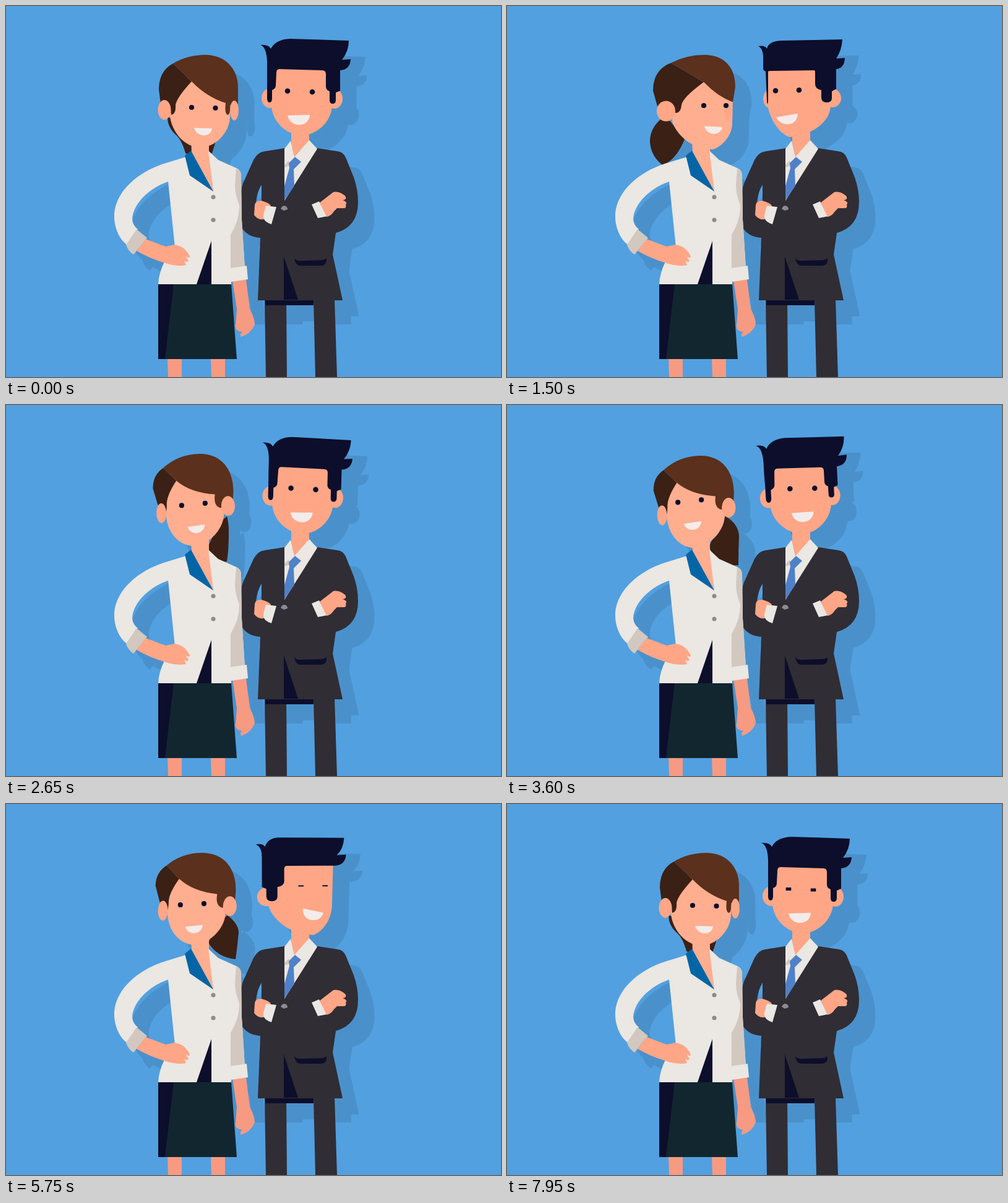
An HTML page that plays this animation: 800 by 600 pixels, repeating every 8 s.

```html
<!DOCTYPE html>
<html lang="en">
<head>
<meta charset="utf-8">
<title>Colleagues</title>
<style>
html, body { margin: 0; width: 100%; height: 100%; overflow: hidden; background: #52a0e0; }
svg { display: block; width: 800px; height: 600px; }
.suit { fill: var(--s, #302d35); }
.navy { fill: var(--s, #0c0e2b); }
.shirt { fill: var(--s, #ebe7e2); }
.fold { fill: var(--s, #d2c8c0); }
.tie { fill: var(--s, #4f81c9); }
.skin { fill: var(--s, #ffa686); }
.fair { fill: var(--s, #ffae8f); }
.limb { fill: var(--s, #f79a82); }
.collar { fill: var(--s, #0465a6); }
.skirt { fill: var(--s, #122630); }
.button { fill: var(--s, #8d8b92); }
.brown { fill: var(--s, #5b301c); }
.dark { fill: var(--s, #3b2015); }
.teeth { fill: var(--s, #f3ecea); }
</style>
</head>
<body>
<svg viewBox="0 0 800 600">
  <defs><clipPath id="wall"><path d="M0,0H800V515H0Z"/></clipPath></defs>
  <rect width="800" height="600" fill="#52a0e0"/>
  <g clip-path="url(#wall)"><use href="#pair" x="26.5" y="26" style="--s:#4a91cb"/></g>
  <g id="pair">
    <path class="suit" d="M418,474H453L454,600H420ZM497,474H531L535,600H500Z"/>
    <path class="navy" d="M419,470H497V484H419Z"/>
    <path class="suit" fill-rule="evenodd" d="M450,230L418,235Q407,236 400,249L383,287Q379,297 379,315L381,358Q389,373 411,375L407,476H544L528,402L533,367Q569,357 569,317Q569,297 562,277L549,245Q545,236 536,235L503,230ZM413,289Q406,300 404,317L413,315Z"/>
    <path class="skin" d="M461,195H490V219L466,246L461,222Z"/>
    <path class="shirt" d="M460,218L450,231V315L503,231L490,217L466,244Z"/>
    <path class="fold" d="M450,261V257L457,250L459,258Z"/>
    <path class="tie" d="M467,244L477,252L465,264L466,291L450,314V291L458,262L457,254Z"/>
    <path class="navy" d="M449,405L472,475H449ZM466,407Q468,412 475,412L510,411Q517,410 518,407V412Q517,420 508,420H475Q467,419 466,407Z"/>
    <path class="skin" d="M402,322Q403,314 413,315Q425,318 428,323L420,344Q408,348 401,338Z"/>
    <path class="shirt" d="M420,323L437,325L429,353Q414,348 416,338ZM494,321L506,316L519,340L504,343Z"/>
    <path class="button" d="M444,328Q446,323 450,323Q455,324 455,329L449,331Z"/>
    <path class="skin" d="M507,318L529,301Q538,299 548,307Q552,313 544,314Q553,317 549,321Q551,327 545,327H535L530,332Q525,340 518,341Z"/>
    <g id="man"></g>

    <path id="pony" class="dark"/>
    <path class="limb" d="M261,570H284V600H262ZM331,570H354V600H332ZM366,444L388,442L394,490Q402,505 402,515Q396,530 380,535Q377,531 382,527Q370,526 371,517L373,490Z"/>
    <path class="fair" d="M299,212H328V236L335,300L300,240Z"/>
    <path class="skirt" d="M246,449H364L373,571H246Z"/>
    <path class="navy" d="M246,449H271L257,571H246Z"/>
    <path class="shirt" d="M291,244L335,300L327,234L343,249L372,262Q380,265 380,275L381,345L386,424L364,430V450H246Q247,430 258,410L273,390L262,284C228,296 205,322 204,345Q205,355 213,361L195,386C180,374 174,353 175,336C178,298 215,268 255,255Z"/>
    <path class="fold" d="M372,263Q380,265 380,275L381,345L386,424L363,426V370Q378,345 377,322Q370,305 370,290ZM194,386L211,361L228,375L206,402Q197,396 194,386Z"/>
    <path class="shirt" d="M362,424L389,420L391,442L364,446Z"/>
    <path class="navy" d="M332,380V450H308Z"/>
    <path class="collar" d="M299,234L289,242L297,274L335,300Z"/>
    <circle class="button" cx="335" cy="309" r="3.6"/>
    <circle class="button" cx="335" cy="346" r="3.6"/>
    <path class="skin" d="M226,377L258,389L272,386Q289,388 297,405Q297,409 290,405L295,412Q293,416 288,412L291,419Q275,422 255,415Q232,408 211,396Z"/>
    <g id="woman"></g>
  </g>
</svg>
<script>
const LOOP = 8000;
const NUMBER = /-?\d+(\.\d+)?/g;
const byId = id => document.getElementById(id);

// Blend the numbers of two strings that share one structure.
function mix(a, b, k) {
  const ends = b.match(NUMBER);
  let i = 0;
  return a.replace(NUMBER, v => (+v + (ends[i++] - v) * k).toFixed(2));
}
// Shapes are listed as facing left, front, right; turn runs from -1 to 1.
const facing = ([left, front, right], turn) => mix(front, turn < 0 ? left : right, Math.abs(turn));

const manShapes = {
  // centre and radii
  earA: ['423,150,9,14', '427,149,14,16', '421,150,15,15'],
  earB: ['526,149,14,15', '531,150,13,16', '510,150,13,15'],
  face: [
    'M421,100 L421,160 C425,185 442,208 457,212 C488,210 523,190 523,160 L523,100Z',
    'M429,100 L429,160 C429,185 452,209 478,209 C504,209 527,185 527,160 L527,100Z',
    'M421,98 L423,160 C429,185 455,210 497,212 C512,206 526,188 527,165 L529,98Z'],
  hair: [
    'M406,65 Q417,63 420,69 Q423,57 442,56 L542,54 Q541,72 532,85 L546,84 Q545,101 532,102 L532,134 L525,138 L525,149 Q525,156 517,156 Q508,156 508,148 L508,136 Q498,134 498,126 L498,110 Q498,104 497,104 L426,105 Q422,105 422,106 L422,132 Q422,136 422,138 L422,150 Q422,158 421,158 Q420,158 420,152 L418,106 L414,103 L414,88 Q415,69 406,65Z',
    'M411,63 Q424,62 428,69 Q436,54 459,53 L554,56 Q554,73 543,87 L557,86 Q556,103 540,104 L540,137 L533,140 L533,152 Q533,158 528,158 Q523,158 523,152 L523,138 Q517,136 517,130 L517,110 Q517,104 511,104 L442,102 Q437,102 437,108 L436,128 Q436,134 430,136 L430,149 Q430,156 426,156 Q422,156 422,149 L422,130 L422,110 L422,90 Q421,66 411,63Z',
    'M404,65 Q416,63 419,69 Q424,54 442,54 L547,55 Q546,73 535,83 L550,82 Q549,99 532,100 L529,100 L529,100 L529,100 Q529,100 529,100 Q529,100 529,100 L529,100 Q529,100 529,100 L529,100 Q529,100 524,100 L455,100 Q450,100 450,105 L450,125 Q450,132 439,134 L439,149 Q439,157 430,157 Q421,157 421,149 L421,137 L414,134 L414,85 Q414,69 404,65Z'],
  mouth: [
    'M435,180 L470,174 C469,196 443,196 435,180Z',
    'M455,177 L491,176 C490,197 459,198 455,177Z',
    'M480,169 L513,176 C508,195 478,191 480,169Z'],
  eyes: ['434,137,472,136', '455,137.5,495,139', '477,132.5,516,132.5']
};

const womanShapes = {
  face: [
    'M258,150 L260,185 C264,212 282,229 303,230 C328,228 350,205 353,182 L352,150 L340,130 L300,110 L262,122Z',
    'M264,150 L265,178 C268,205 290,229 314,229 C338,229 361,205 362,180 L362,150 L355,120 L300,110 L268,128Z',
    'M268,150 L267,187 C275,210 300,232 333,232 C350,226 364,208 364,190 L365,150 L355,130 L310,112 L275,135Z'],
  dark: [
    'M256,103 Q239,114 239,136 L247,164 L256,164 Q257,168 257,177 Q261,178 261,160 Q262,146 277,124Z',
    'M270,93 Q247,105 247,135 L250,158 L262,158 Q266,162 267,176 Q275,175 274,160 Q276,148 300,122Z',
    'M265,92 Q236,103 236,137 L243,162 L262,162 Q272,166 272,173 Q281,173 282,160 Q284,148 318,123Z'],
  brown: [
    'M256,103 Q281,81 315,81 C349,81 369,105 369,142 L368,156 L352,158 Q349,160 349,169 Q336,167 339,147 Q300,144 277,124Z',
    'M270,93 Q293,79 322,79 C353,79 375,100 375,132 L375,158 L362,160 Q363,176 358,176 Q353,174 355,157 Q324,147 300,122Z',
    'M265,92 Q290,79 319,79 C350,79 369,98 369,131 L365,155 L364,155 Q364,155 364,155 Q364,155 364,155 Q340,146 318,123Z'],
  earA: ['252,176,8,16', '256,168,10.5,16', '257,170,15,16.5'],
  earB: ['360,166,11,16', '369,169,7,16', '357,172,5,14'],
  mouth: [
    'M287,194 L315,190.5 C314,207 291,209 287,194Z',
    'M304,197 L333,198 C331,214 307,212 304,197Z',
    'M319,194 L348,196 C345,211 322,210 319,194Z'],
  eyes: ['278,159,316,156', '300,164,338.5,165', '318,161,354,161']
};

const ponies = [
  'M261,180 Q261,196 274,208 Q284,216 290,238 Q310,250 333,238 L345,200Z',
  'M250,182 Q231,197 231,219 Q232,242 251,257 Q272,251 287,216 L262,184Z',
  'M357,180 Q360,190 360,205 Q360,235 357,253 Q335,258 326,230 L345,190Z',
  'M353,180 Q374,192 375,212 Q374,235 374,259 Q335,262 327,228 L345,190Z',
  'M355,180 Q379,196 379,215 Q378,235 377,256 Q342,253 327,227 L345,190Z',
  'M358,180 Q376,194 376,208 Q374,230 371,251 Q341,248 327,224 L345,190Z'
];

// time, turn, tilt, feature x, feature y, lift
const manKeys = [
  [0, 0, 0, 0, 0, 0], [850, -.95, .3, 0, 0, 0], [1500, -1, 0, 0, 0, 0], [1750, -.98, 0, 0, 0, 0],
  [2500, .02, 1.5, 3, -1.5, -1], [2650, .03, 1.4, 3, -1.5, -1], [3600, .08, -3.2, 5, -1.5, -1],
  [4250, .95, -5.7, 0, 0, 0], [4800, 1, -5.5, 0, 0, 0], [5100, 1, -5, 0, 0, 0], [5650, 1, -.3, 0, 0, 0],
  [5950, 1, 0, 0, 0, 0], [6600, .03, 1.2, 2, -1, 0], [7400, 0, .1, 0, 0, 0], [8000, 0, 0, 0, 0, 0]
];
// the same, then ponytail
const womanKeys = [
  [0, 0, 0, 0, 0, 0, 0], [850, .96, 0, 0, 0, 0, 1], [1500, 1, 0, 0, 0, 0, 1], [1750, .99, 0, 0, 0, 0, 1],
  [2600, -1, -.9, 7, 5, -2, 2], [2700, -1, -.9, 7, 5, -2, 2], [3500, -1, -1.3, 0, -3.5, 1, 3],
  [3650, -1, -1.3, 0, -3.5, 1, 3], [4800, -1, 0, 0, 0, 0, 4], [5700, -1, 1.5, 2, 7, -2, 5],
  [5950, -1, 1.5, 2, 7, -2, 5], [6900, -.15, .1, 0, 0, 0, 0], [8000, 0, 0, 0, 0, 0, 0]
];
const manBlinks = [5750, 7890];

function pose(keys, time) {
  const i = keys.findIndex(key => key[0] > time);
  const from = keys[i - 1], to = keys[i];
  const p = (time - from[0]) / (to[0] - from[0]);
  const k = p * p * (3 - 2 * p);
  return { from, to, k, at: from.map((v, n) => v + (to[n] - v) * k) };
}

function add(parent, tag, cls) {
  const node = document.createElementNS('http://www.w3.org/2000/svg', tag);
  if (cls) node.setAttribute('class', cls);
  return parent.appendChild(node);
}
function set(node, values) {
  for (const name in values) node.setAttribute(name, values[name]);
}

function makeHead(id, shapes, classes, pivot, eyeSize) {
  const root = byId(id), parts = {};
  for (const name in classes)
    parts[name] = add(root, name.startsWith('ear') ? 'ellipse' : 'path', classes[name]);
  const features = add(root, 'g');
  const mouth = add(features, 'path', 'teeth');
  const eyes = [add(features, 'rect', 'navy'), add(features, 'rect', 'navy')];

  return ([, turn, tilt, fx, fy, lift], open = 1) => {
    set(root, { transform: `translate(0 ${lift}) rotate(${tilt} ${pivot})` });
    set(features, { transform: `translate(${fx} ${fy})` });
    for (const name in parts) {
      const shape = facing(shapes[name], turn);
      if (name.startsWith('ear')) {
        const [cx, cy, rx, ry] = shape.split(',');
        set(parts[name], { cx, cy, rx, ry });
      } else set(parts[name], { d: shape });
    }
    set(mouth, { d: facing(shapes.mouth, turn) });
    const spots = facing(shapes.eyes, turn).split(',');
    const height = Math.max(2, eyeSize * open);
    eyes.forEach((eye, n) => set(eye, {
      x: spots[2 * n] - eyeSize / 2, y: spots[2 * n + 1] - height / 2,
      width: eyeSize, height, rx: eyeSize / 2 * Math.max(0, 2 * open - 1)
    }));
  };
}

const drawMan = makeHead('man', manShapes,
  { earA: 'skin', earB: 'skin', face: 'skin', hair: 'navy' }, '475 215', 8.6);
const drawWoman = makeHead('woman', womanShapes,
  { face: 'fair', dark: 'dark', brown: 'brown', earA: 'skin', earB: 'skin' }, '313 235', 8.2);

function draw(time) {
  const open = Math.min(1, ...manBlinks.map(mid => Math.abs(time - mid) / 110));
  drawMan(pose(manKeys, time).at, open);
  const { from, to, k, at } = pose(womanKeys, time);
  drawWoman(at);
  set(byId('pony'), { d: mix(ponies[from[6]], ponies[to[6]], k) });
}

function tick() {
  draw(performance.now() % LOOP);
  requestAnimationFrame(tick);
}
tick();
</script>
</body>
</html>
```
